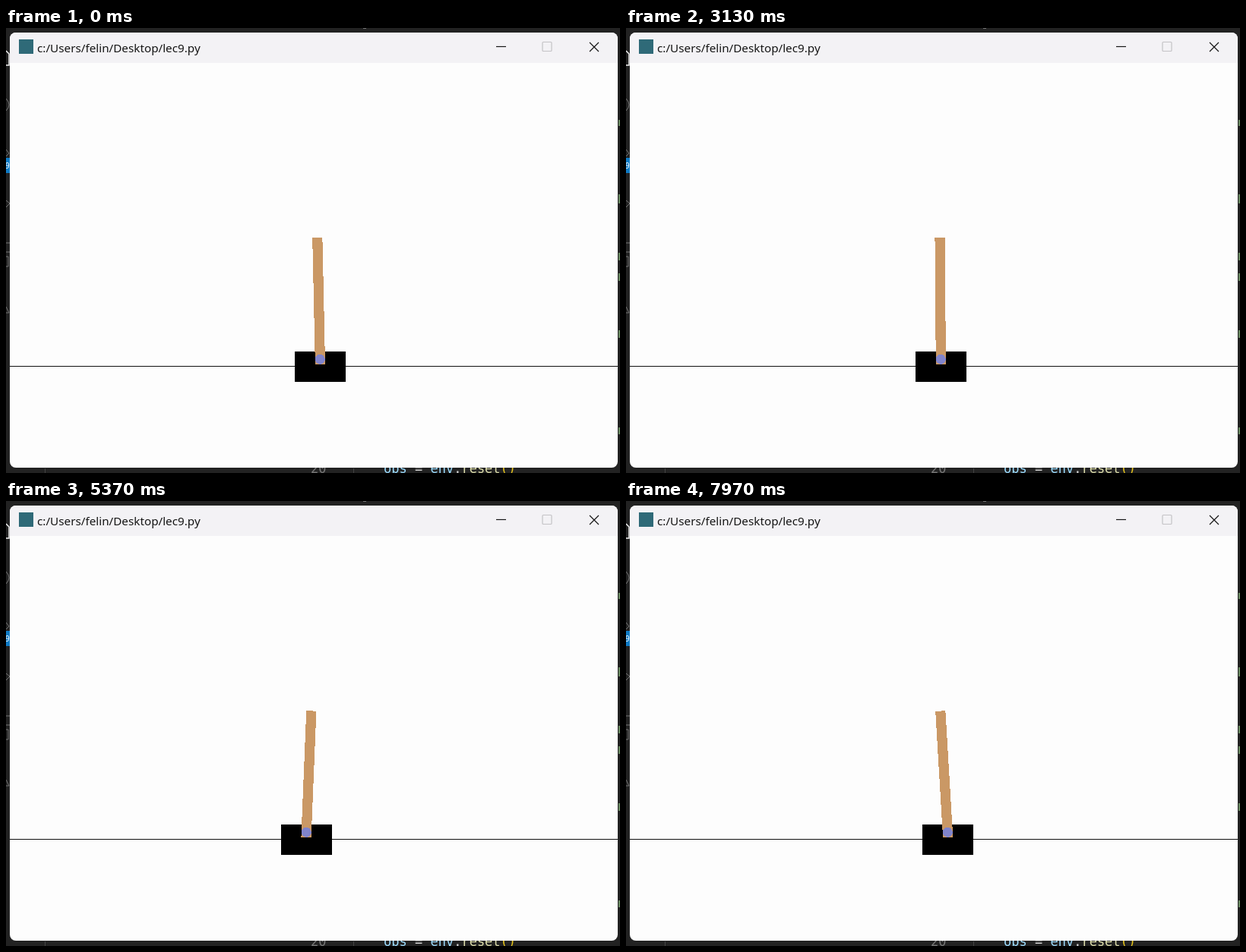
Animation, 808 px wide and 586 px high, one loop 8000 ms. Source, as an HTML page:

```html
<!DOCTYPE html>
<html lang="en">
<head>
<meta charset="utf-8">
<title>Balancing cart</title>
<style>
  html, body { margin: 0; width: 100%; height: 100%; overflow: hidden; background: #222; }
  svg { display: block; width: 100%; height: 100%; }
  .title { font: 15.25px "Noto Sans", sans-serif; fill: #161616; }
  .code { font: 17px "DejaVu Sans Mono", monospace; white-space: pre; }
</style>
</head>
<body>
<svg viewBox="0 0 808 586">
  <rect width="808" height="586" fill="#222"/>

  <!-- editor peeking out around the window -->
  <g fill="none" stroke="#777">
    <path d="M0 30L4 34V49H0" stroke="#f2f2f2" stroke-width="1.5"/>
    <path d="M0 93Q4 97 4 101T0 109M0 160L4 165L0 169M0 227L5 231L0 236M0 283H5M0 295H5M0 301H3V314H0M0 367L4 375H0"/>
    <path d="M51.500 580V586M457.500 580V586" stroke="#444"/>
    <path d="M470 .5H474" stroke="#777"/>
    <path d="M807 121V129M807 219V231M807 296V306M807 323V333M807 398V408M807 526V535" stroke="#6a8a62" stroke-width="2"/>
  </g>
  <rect y="171" width="6" height="20" fill="#0e7ac4"/>
  <text x="-1" y="185" font-size="10" font-family="Noto Sans, sans-serif" fill="#fff">9</text>
  <g class="code">
    <text x="401" y="586" fill="#777">20</text>
    <text x="497" y="586" fill="#9cdcfe">obs <tspan fill="#d4d4d4">= </tspan>env<tspan fill="#d4d4d4">.</tspan><tspan fill="#dcdcaa">reset</tspan><tspan fill="#e6c41c">()</tspan></text>
  </g>

  <!-- window -->
  <rect x="5" y="6" width="800" height="573" rx="8" fill="#fdfdfd"/>
  <path d="M5 46V14a8 8 0 0 1 8-8H797a8 8 0 0 1 8 8V46Z" fill="#f3f2f5"/>
  <rect x="17" y="15" width="19" height="19" fill="#2f6a78"/>
  <text class="title" x="41" y="32">c:/Users/felin/Desktop/lec9.py</text>
  <g fill="none" stroke="#161616" stroke-width="1.2">
    <path d="M645 24.500H658"/>
    <rect x="706" y="18.500" width="12" height="12" rx="1" stroke="#c4c3c6"/>
    <path d="M768 19L780 31M780 19L768 31"/>
  </g>

  <!-- scene -->
  <rect x="5" y="445" width="800" height="1" fill="#111"/>
  <g id="cart">
    <rect y="426" width="67" height="40"/>
    <g transform="translate(33.300 436.300)" shape-rendering="crispEdges">
      <rect id="pole" x="-6.600" y="-160" width="13.200" height="166.600" fill="#ca9865"/>
      <circle r="6.500" fill="#8184cb"/>
    </g>
  </g>
</svg>
<script>
const LOOP = 8000, STEP = 1000 / 30, POLE = 160;
const cart = document.getElementById('cart');
const pole = document.getElementById('pole');

// turning points: time, cart centre, sideways offset of the pole tip
const turns = [
  [0, 413, -3.5], [850, 409.5, -1.1], [2700, 428, -5.7],
  [3720, 392.5, 6], [4300, 412, -10.9], [5700, 393.5, 9.2],
  [6950, 428.4, -8], [7550, 414, 3], [LOOP, 424, -9.7]
];

// the swing from one turning point to the next is half a cosine wave
function pose(t) {
  const i = turns.findIndex(p => t < p[0]);
  const [t0, x0, tip0] = turns[i - 1], [t1, x1, tip1] = turns[i];
  const e = (1 - Math.cos(Math.PI * (t - t0) / (t1 - t0))) / 2;
  return { x: x0 + (x1 - x0) * e, tip: tip0 + (tip1 - tip0) * e };
}

function draw(ms) {
  const t = Math.floor((ms % LOOP + 3.4) / STEP) * STEP % LOOP;
  const { x, tip } = pose(t);
  const lean = Math.asin(tip / POLE) * 180 / Math.PI;
  cart.setAttribute('transform', `translate(${Math.floor(x - 33)} 0)`);
  pole.setAttribute('transform', `rotate(${lean.toFixed(3)})`);
}

const start = performance.now();
function tick() {
  draw(Math.max(0, performance.now() - start));
  requestAnimationFrame(tick);
}
tick();
</script>
</body>
</html>
```
